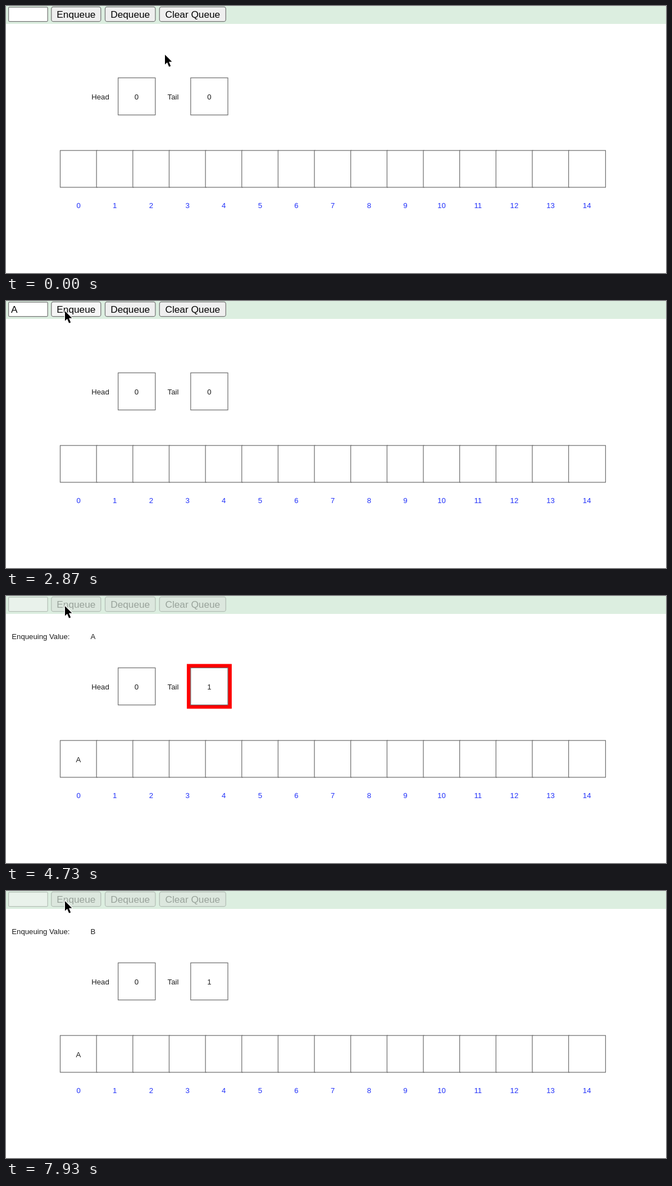
Write an HTML page with a canvas that moves like this. It is 1175 px wide and 477 px high and loops after 8000 ms.

```html
<!DOCTYPE html>
<html lang="en">
<head>
<meta charset="utf-8">
<title>Array queue</title>
<style>
html, body { margin: 0; width: 100%; height: 100%; overflow: hidden; background: #fff; }
canvas { display: block; }
</style>
</head>
<body>
<canvas id="stage" width="1175" height="477"></canvas>
<script>
const ctx = document.getElementById('stage').getContext('2d');
const LOOP = 8000, FRAME = 1000 / 15;
const UI_FONT = '17.24px "Liberation Sans", Arial, sans-serif';
const LABEL_FONT = '13.2px "Liberation Sans", Arial, sans-serif';
const CELL = { x: 96.5, y: 258, pitch: 64.65, size: 65.8 };
const TAIL = { x: 328.8, y: 128.3, size: 66.2 };

// Pointer path: time, x, y
const PATH = [
  [0, 283, 87], [200, 252, 76], [500, 140, 38], [870, 37, 14],
  [2260, 37, 14], [2470, 52, 56], [2600, 80, 50], [2800, 105, 18],
  [5130, 105, 18], [5330, 84, 18], [5470, 68, 22],
  [5600, 68, 22], [5930, 69, 19],
  [7000, 69, 19], [7130, 101, 19], [7260, 101, 19], [7330, 105, 18]
];

const within = (t, from, to) => t >= from && t < to;
const mix = (a, b, p) => a + (b - a) * p;

function pointerAt(t) {
  const i = PATH.findIndex(key => key[0] > t);
  if (i < 0) return PATH[PATH.length - 1].slice(1);
  const [a, b] = [PATH[i - 1], PATH[i]];
  const p = (t - a[0]) / (b[0] - a[0]);
  return [mix(a[1], b[1], p), mix(a[2], b[2], p)];
}

function text(str, x, y, color = '#1c1c1c', align = 'center', font = LABEL_FONT) {
  ctx.font = font;
  ctx.textAlign = align;
  ctx.fillStyle = color;
  ctx.fillText(str, x, y);
}

function box(x, y, w, h, fill, stroke, radius = 0, line = 1.25) {
  ctx.beginPath();
  ctx.roundRect(x, y, w, h, radius);
  ctx.fillStyle = fill;
  ctx.fill();
  ctx.strokeStyle = stroke;
  ctx.lineWidth = line;
  ctx.stroke();
}

function button(label, x, w, disabled, fill) {
  box(x, 1.7, w, 26, disabled ? '#dce7de' : fill, disabled ? '#b2bdb4' : '#747474', 3.5);
  text(label, x + w / 2, 20.8, disabled ? '#98a29a' : '#000', 'center', UI_FONT);
}

function toolbar(t, [px, py]) {
  const disabled = within(t, 2990, 5190) || t >= 7860;
  const pressed = within(t, 2860, 2990) || within(t, 7790, 7860);
  const focused = within(t, 930, 2860) || within(t, 6060, 7790);
  const hover = px >= 80 && px < 169 && py < 28;
  const value = within(t, 2260, 2990) ? 'A' : within(t, 6790, 7860) ? 'B' : '';
  const caret = within(t, 1060, 1595) || within(t, 2130, 2860) || within(t, 6260, 7265);

  ctx.fillStyle = '#dceee0';
  ctx.fillRect(0, 0, 1175, 32);
  if (focused) box(5, 2, 69, 25.6, '#fff', '#0b5cd0', 2.5, 2.6);
  else box(4.6, 2, 69.6, 25.6, disabled ? '#e9f2eb' : '#fff', disabled ? '#b5c0b7' : '#767676', 1.5);
  text(value, 9, 20.8, '#000', 'left', UI_FONT);
  if (caret) {
    ctx.fillStyle = '#000';
    ctx.fillRect(value ? 19.8 : 9.3, 6.5, 1.3, 17.5);
  }

  button('Enqueue', 80.8, 88, disabled, pressed ? '#f6f6f6' : hover ? '#e4e4e5' : '#efefef');
  button('Dequeue', 176.5, 89.4, disabled, '#efefef');
  button('Clear Queue', 273.3, 118, disabled, '#efefef');
}

function queue(t) {
  const stroke = '#707070';
  const message = within(t, 2990, 5190) ? 'A' : t >= 7925 ? 'B' : '';
  if (message) {
    text('Enqueuing Value:', 10.3, 76.5, undefined, 'left');
    text(message, 155, 76.5);
  }

  text('Head', 168, 167);
  text('Tail', 297.5, 167);
  box(199.6, TAIL.y, TAIL.size, TAIL.size, '#fff', stroke);
  text('0', 232.5, 167);

  if (within(t, 4190, 5190)) {
    const d = 8 - Math.abs(Math.min(t, 5000) - 4530) * 0.0056;
    ctx.fillStyle = '#f00';
    ctx.fillRect(TAIL.x - d, TAIL.y - d, TAIL.size + 2 * d, TAIL.size + 2 * d);
  }
  box(TAIL.x, TAIL.y, TAIL.size, TAIL.size, '#fff', stroke);
  text(t >= 4660 ? '1' : '0', 361.8, 167);

  for (let i = 0; i < 15; i++) {
    const x = CELL.x + i * CELL.pitch;
    box(x, CELL.y, CELL.size, CELL.size, '#fff', stroke);
    text(i, x + 32.6, 360.8, '#2232fa');
  }
  if (t >= 4190) text('A', 129, 296.5);
}

function highlightCircle(t) {
  if (!within(t, 3060, 4190)) return;
  let p = 0;
  if (t >= 3865) p = Math.min(1, 0.275 + (t - 3866.7) / FRAME * 0.1795);
  else if (t >= 3530) p = 0.096;
  ctx.beginPath();
  ctx.arc(mix(361.5, 129, p), mix(162, 356, p), 25.9, 0, Math.PI * 2);
  ctx.strokeStyle = '#1304f5';
  ctx.lineWidth = 5.2;
  ctx.stroke();
}

function arrow() {
  ctx.beginPath();
  [[0, 0], [0, 17.5], [4, 13.8], [7.2, 21.5], [10.2, 20.2], [7, 12.7], [12.4, 12.4]]
    .forEach(([x, y]) => ctx.lineTo(x, y));
  ctx.closePath();
  ctx.lineJoin = 'round';
  ctx.strokeStyle = '#fff';
  ctx.lineWidth = 2.4;
  ctx.stroke();
  ctx.fillStyle = '#000';
  ctx.fill();
}

function beam(h) {
  ctx.beginPath();
  ctx.moveTo(-4, -h);
  ctx.quadraticCurveTo(0, -h, 0, 3 - h);
  ctx.quadraticCurveTo(0, -h, 4, -h);
  ctx.moveTo(0, 3 - h);
  ctx.lineTo(0, h - 3);
  ctx.moveTo(-4, h);
  ctx.quadraticCurveTo(0, h, 0, h - 3);
  ctx.quadraticCurveTo(0, h, 4, h);
  for (const [color, width] of [['#fff', 3.4], ['#111', 1.4]]) {
    ctx.strokeStyle = color;
    ctx.lineWidth = width;
    ctx.stroke();
  }
}

function pointer(t, [x, y]) {
  ctx.save();
  ctx.translate(x, y);
  if (x < 75 && y < 28) beam(t < 4000 ? 6 : 9);
  else arrow();
  ctx.restore();
}

function draw(now) {
  const t = Math.floor((now % LOOP + 4) / FRAME) * FRAME % LOOP;
  const at = pointerAt(t);
  ctx.fillStyle = '#fff';
  ctx.fillRect(0, 0, 1175, 477);
  toolbar(t, at);
  queue(t);
  highlightCircle(t);
  pointer(t, at);
  requestAnimationFrame(draw);
}
requestAnimationFrame(draw);
</script>
</body>
</html>
```
